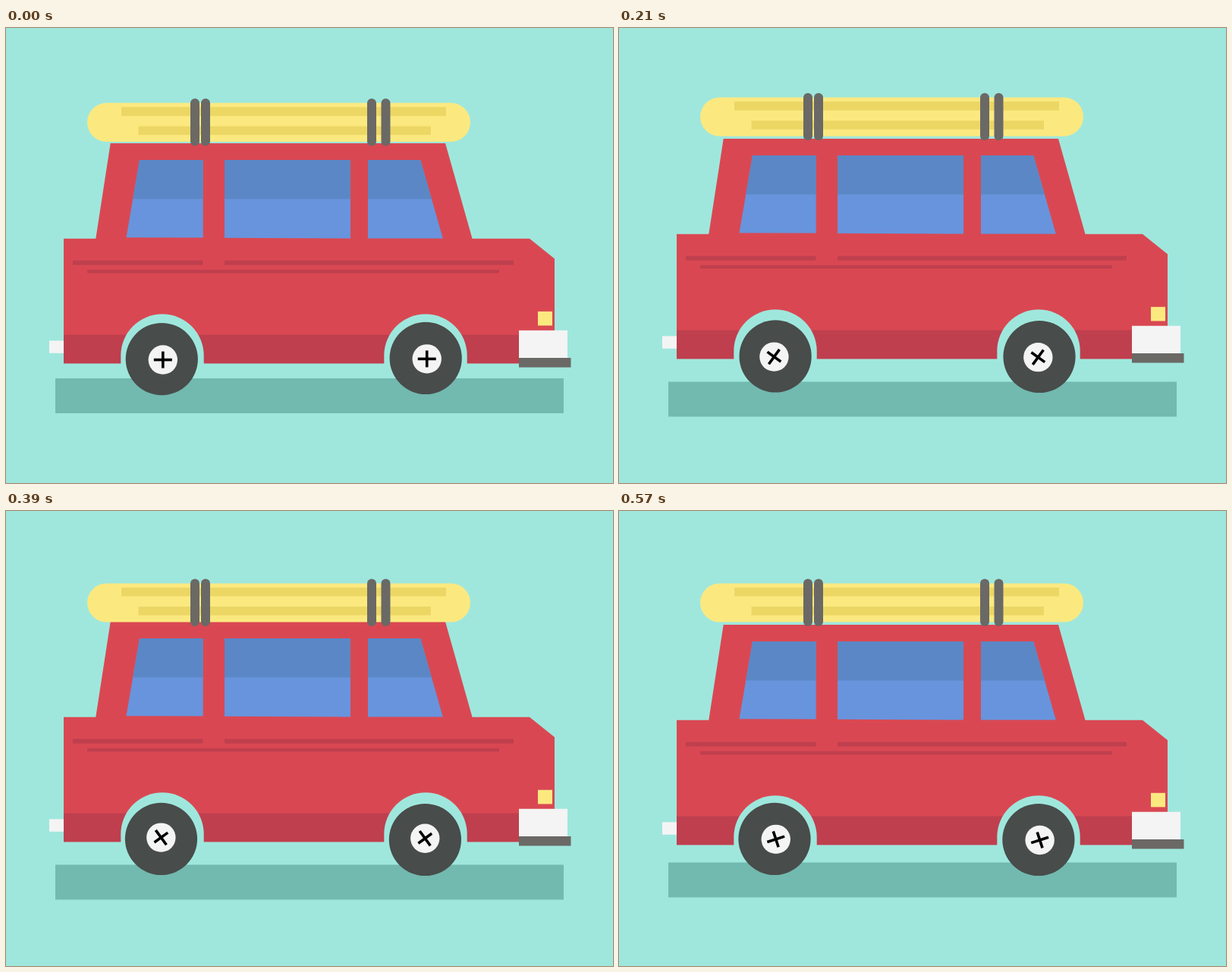
Animation, 800 px wide and 600 px high, one loop 0.6 s. Source, as an HTML page with a canvas:

```html
<!DOCTYPE html>
<html lang="en">
<head>
<meta charset="utf-8">
<title>Road trip</title>
<style>
  html, body { margin: 0; width: 100%; height: 100%; overflow: hidden; background: #9fe7dd; }
  canvas { display: block; width: 800px; height: 600px; }
</style>
</head>
<body>
<canvas id="stage" width="800" height="600"></canvas>
<script>
const ctx = document.getElementById('stage').getContext('2d');
const STEP = 30, COUNT = 20;
const C = {
  sky: '#9fe7dd', shade: '#72b9af', red: '#d94852', dark: '#bf3f4e',
  yellow: '#fbe980', ochre: '#ecd765', grey: '#6a6966', white: '#f4f4f4',
  glass: '#5b87c6', glow: '#6894dd', tire: '#484c4a'
};

const ease = p => p >= 1 ? 1 : p * p * (3 - 2 * p);

function box(color, x1, y1, x2, y2, r = 0) {
  ctx.fillStyle = color;
  ctx.beginPath();
  ctx.roundRect(x1, y1, x2 - x1, y2 - y1, r);
  ctx.fill();
}

function disc(color, x, y, r) {
  ctx.fillStyle = color;
  ctx.beginPath();
  ctx.arc(x, y, r, 0, 2 * Math.PI);
  ctx.fill();
}

function trace(...pts) {
  pts.forEach(([x, y], i) => i ? ctx.lineTo(x, y) : ctx.moveTo(x, y));
  ctx.closePath();
}

function shifted(dy, draw) {
  ctx.save();
  ctx.translate(0, dy);
  draw();
  ctx.restore();
}

function arch(x) {
  const r = 54.7;
  ctx.fillStyle = C.sky;
  ctx.beginPath();
  ctx.arc(x, 432, r, Math.PI, 0);
  ctx.lineTo(x + r, 443);
  ctx.lineTo(x - r, 443);
  ctx.fill();
}

function windows() {
  ctx.save();
  ctx.beginPath();
  trace([176, 174], [259.7, 174], [259.7, 276.5], [158.5, 276.2]);
  trace([288, 174], [454, 174], [454, 277.5], [288, 276.7]);
  trace([477, 174], [546.2, 174], [575.8, 277.5], [477, 277.5]);
  ctx.clip();
  box(C.glow, 150, 170, 580, 280);
  box(C.glass, 150, 170, 580, 225.6);
  ctx.restore();
}

function car() {
  box(C.white, 57, 412.3, 76, 428.8);
  ctx.fillStyle = C.red;
  ctx.beginPath();
  trace([137.7, 152], [579, 152], [614.5, 277.7], [690, 277.7], [723, 304.3],
        [723, 442.3], [76, 442.3], [76, 277.7], [118.3, 277.7]);
  ctx.fill();
  box(C.dark, 76, 404.4, 676, 442.3);
  box(C.dark, 88, 306.4, 259.5, 312.6);
  box(C.dark, 288, 306.4, 669, 312.6);
  box(C.dark, 107, 318.7, 650, 323.2);
  windows();
  arch(206);
  arch(553);
  box(C.yellow, 701, 373.8, 720, 392.4);
  box(C.white, 676, 398.8, 740, 435.2);
  box(C.grey, 676, 435, 744.5, 447.4);
}

function rack() {
  box(C.yellow, 107, 98.8, 612, 150, 25.6);
  box(C.ochre, 152, 104.3, 580, 116);
  box(C.ochre, 174.5, 129.4, 560, 141);
  for (const x of [243, 257, 476, 494.5]) box(C.grey, x, 93, x + 12, 155.4, 6);
}

function wheel(x, y, turn) {
  x += Math.sin(turn);
  disc(C.tire, x, y, 47.6);
  // the hub sits slightly off the axle and circles it
  const a = turn + 0.56;
  ctx.save();
  ctx.translate(x + 1.8 * Math.cos(a), y + 1.8 * Math.sin(a));
  disc(C.white, 0, 0, 19.2);
  ctx.rotate(turn);
  box('#000', -12, -1.8, 12, 1.8);
  box('#000', -1.8, -11, 1.8, 11);
  ctx.restore();
}

function render(now) {
  const n = Math.floor(now / STEP) % COUNT;
  const turn = n / COUNT * 2 * Math.PI;
  const bounce = 5 - Math.abs(n % 10 - 5);
  // the rack is tossed up once, then comes to rest a little higher
  const lift = n < 5 ? 2.24 * n : Math.max(3.4, 11.2 - 2 * (n - 5));

  box(C.sky, 0, 0, 800, 600);
  shifted(bounce * 1.53, () => box(C.shade, 65, 462, 735, 508));
  shifted(-2 * bounce, car);
  shifted(-lift, rack);
  wheel(205.3, 436.6 - 4.2 * ease(n / 9), turn);
  wheel(553.2, 435.4 - 1.9 * ease(n / 5), turn);
}

const start = performance.now();
function loop() {
  render(performance.now() - start);
  requestAnimationFrame(loop);
}
loop();
</script>
</body>
</html>
```
